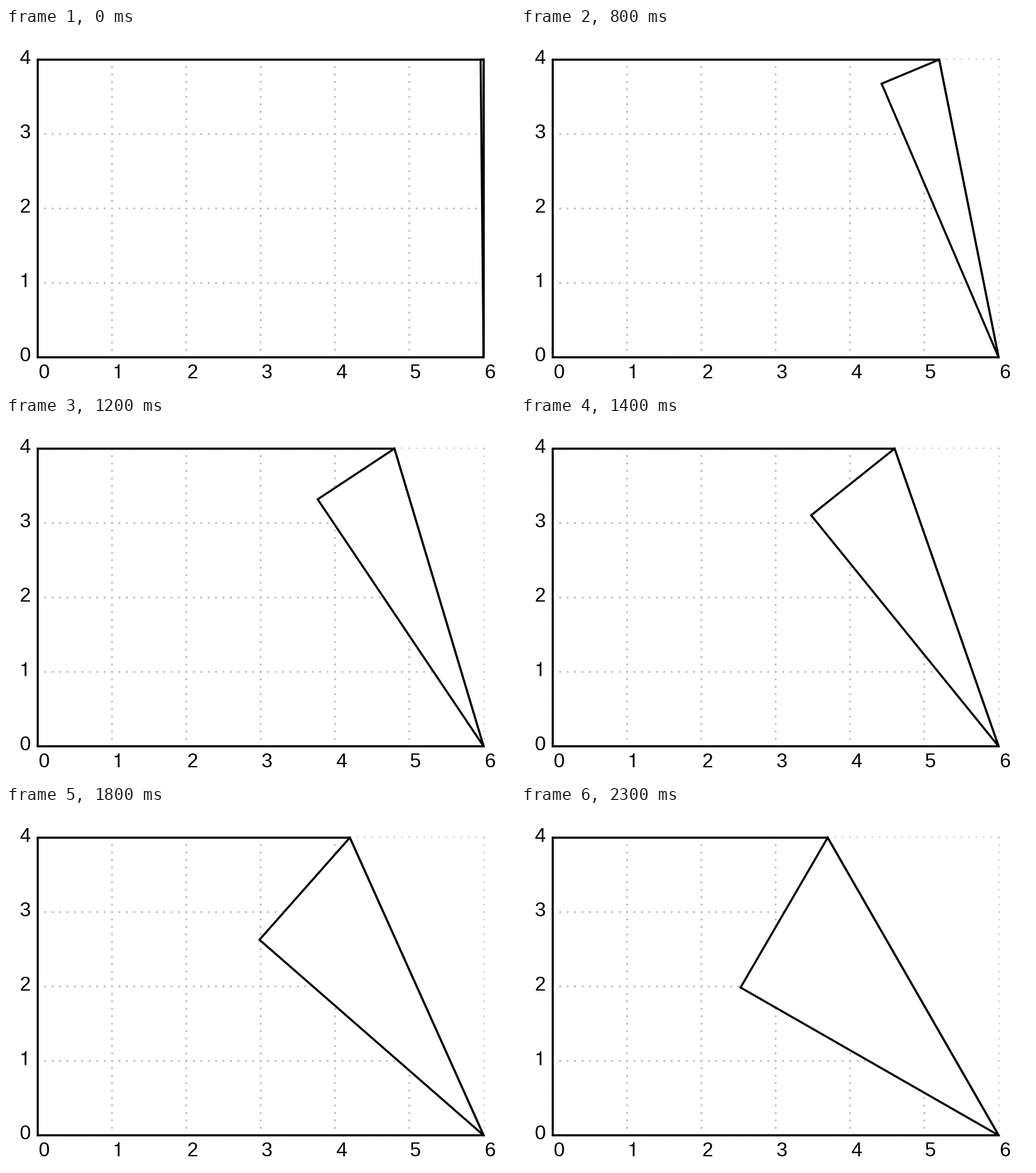
A matplotlib script that plays this animation: 809x573 px, repeating every 2.4 s.

```python
import matplotlib.pyplot as plt
import numpy as np
from matplotlib.animation import FuncAnimation
from matplotlib.patches import Polygon

W, H = 809, 573
FRAMES, INTERVAL = 24, 100
UNIT, X0, Y0 = 118.11, 50.4, 522.7   # pixels per unit, grid origin
COLS, ROWS = 6, 4
LINE = 3.3
FONT = 31.5

fig = plt.figure(figsize=((W + 0.01) / 72, (H + 0.01) / 72), dpi=72,
                 facecolor="white")
ax = fig.add_axes([0, 0, 1, 1])
ax.set(xlim=(0, W), ylim=(H, 0))
ax.axis("off")


def px(points):
    """Grid units to stage pixels."""
    return np.asarray(points, float) * [UNIT, -UNIT] + [X0, Y0]


def dotted(a, b):
    """Ten round dots per unit."""
    on = 0.03
    dash = (0, (on, UNIT / 10 / LINE - on))
    (x1, y1), (x2, y2) = px([a, b])
    end_x, end_y = x2 + 0.1 * (x2 > x1), y2 - 0.1 * (y2 < y1)
    ax.plot([x1, end_x], [y1, end_y], color="0.74", lw=LINE, ls=dash,
            dash_capstyle="round", snap=False, zorder=1)


def digit(n, x, y):
    if n == 1:
        # plain stem and flag, no foot
        shape = np.array([(259, 0), (347, 0), (347, 709), (289, 709),
                          (272, 652), (250, 612), (215, 587), (165, 575),
                          (102, 568), (102, 505), (259, 505)]) / 1000
        ax.add_patch(Polygon(shape * [FONT, -FONT] + [x, y], fc="black",
                             lw=0, snap=False, zorder=5))
    else:
        ax.text(x, y, str(n), family="Liberation Sans", size=FONT,
                color="black", ha="left", va="baseline", zorder=5)


def sheet(z, **style):
    patch = Polygon(np.zeros((3, 2)), closed=True, joinstyle="miter",
                    snap=False, zorder=z, **style)
    return ax.add_patch(patch)


for i in range(COLS + 1):
    dotted((i, 0), (i, ROWS))
    digit(i, X0 + i * UNIT + 1, 556)
for j in range(ROWS + 1):
    dotted((0, j), (COLS, j))
    digit(j, 21.5, Y0 - j * UNIT + 6.7)

outline = dict(ec="black", lw=LINE)
gap = sheet(2, fc="white", lw=0)
paper = sheet(3, fc="none", **outline)
flap = sheet(4, fc="white", **outline)


def update(k):
    d = 0.1 * k
    pivot, crease = (COLS, 0), (COLS - d, ROWS)
    # the corner swings by twice the crease angle, slightly ahead of it
    turn = 2 * np.arctan((d + 0.02) / ROWS)
    tip = (COLS - ROWS * np.sin(turn), ROWS * np.cos(turn))
    gap.set_xy(px([pivot, (COLS, ROWS), crease]))
    paper.set_xy(px([(0, 0), pivot, crease, (0, ROWS)]))
    flap.set_xy(px([pivot, crease, tip]))
    return gap, paper, flap


anim = FuncAnimation(fig, update, frames=FRAMES, interval=INTERVAL,
                     repeat=True, repeat_delay=0, blit=False)
plt.show()
```
